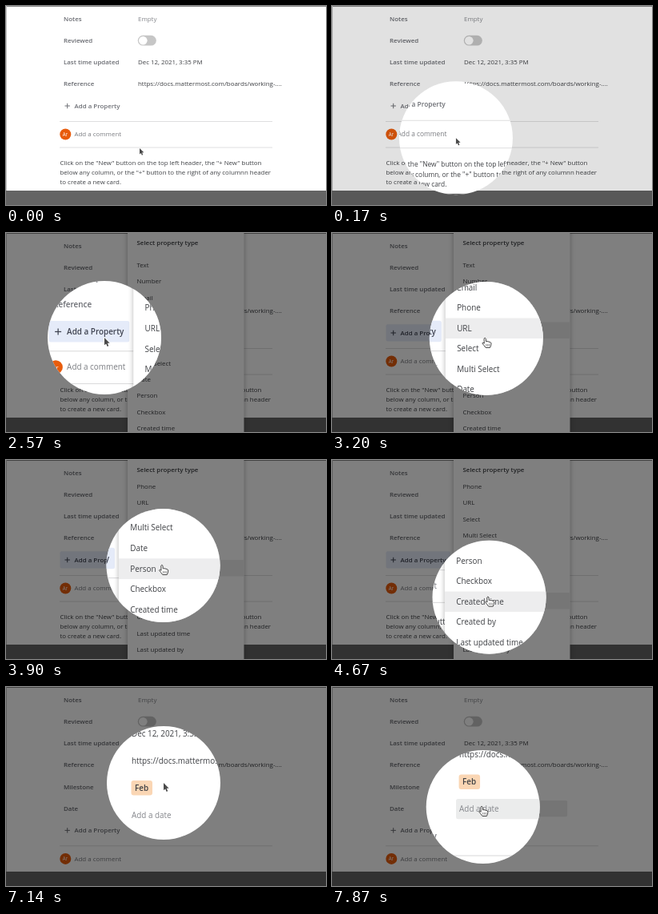
Write an HTML page with a canvas that moves like this. It is 400 px wide and 249 px high and loops after 8000 ms.

```html
<!DOCTYPE html>
<html lang="en">
<head>
<meta charset="utf-8">
<style>
  html, body { margin: 0; width: 100%; height: 100%; overflow: hidden; background: #fff; }
  canvas { display: block; width: 400px; height: 249px; }
</style>
</head>
<body>
<canvas id="stage" width="400" height="249"></canvas>
<script>
const ctx = document.getElementById('stage').getContext('2d');
const W = 400, H = 249, LOOP = 8000, RADIUS = 71, ZOOM = 1.25;
const ROW = 27.2, ITEM = 20.45, SCROLL = 68.3;
const MENU = { x: 152, w: 145.5, listTop: 22, first: 40 };
const TYPES = ['Text', 'Number', 'Email', 'Phone', 'URL', 'Select', 'Multi Select', 'Date', 'Person',
  'Checkbox', 'Created time', 'Created by', 'Last updated time', 'Last updated by'];

// Pointer path: time, x, y
const PATH = [
  [0, 167, 178], [30, 167, 178], [530, 134.5, 143.5], [830, 126, 135], [870, 126, 135],
  [1000, 123, 131], [2570, 123, 131], [3300, 196.5, 132], [3900, 196.5, 132],
  [4170, 196.5, 148], [4370, 196.5, 148], [4770, 196.5, 176], [5170, 196.5, 150],
  [5310, 196.5, 140], [5610, 197, 120], [7140, 197, 120], [7870, 188.7, 150], [LOOP, 188.7, 150]
];

const clamp = v => Math.max(0, Math.min(1, v));
const progress = (t, from, to) => clamp((t - from) / (to - from));
const smooth = p => p * p * (3 - 2 * p);

function pointerAt(t) {
  const i = Math.max(1, PATH.findIndex(k => k[0] > t));
  const [t0, x0, y0] = PATH[i - 1], [t1, x1, y1] = PATH[i];
  const raw = progress(t, t0, t1);
  const p = t0 === 30 ? 1 - (1 - raw) ** 1.4 : t1 - t0 > 350 ? smooth(raw) : raw;
  return { x: x0 + (x1 - x0) * p, y: y0 + (y1 - y0) * p };
}

function text(s, x, y, color = '#3f4145', weight = 400, size = 7.92) {
  ctx.font = `${weight} ${size}px "Open Sans", sans-serif`;
  ctx.fillStyle = color;
  ctx.fillText(s, x, y + size * 0.355);
}

function box(x, y, w, h, r, color) {
  ctx.fillStyle = color;
  ctx.beginPath();
  ctx.roundRect(x, y, w, h, r);
  ctx.fill();
}

function disc(x, y, r, color) {
  ctx.fillStyle = color;
  ctx.beginPath();
  ctx.arc(x, y, r, 0, Math.PI * 2);
  ctx.fill();
}

function property(name, row, value, color) {
  const y = 16 + row * ROW;
  text(name, 72, y, '#686a70', 600);
  if (value) text(value, 165, y, color);
}

function drawPage(t, pointer, extended) {
  ctx.fillStyle = '#fff';
  ctx.fillRect(0, 0, W, H);
  property('Notes', 0, 'Empty', '#85878c');
  property('Reviewed', 1);
  box(164.8, 36.8, 23, 12.8, 6.4, '#c6c6c6');
  disc(171.3, 43.2, 5.3, '#fff');
  property('Last time updated', 2, 'Dec 12, 2021, 3:35 PM');
  property('Reference', 3, 'https://docs.mattermost.com/boards/working-....');

  if (extended) {
    property('Milestone', 4);
    box(164.6, 117.6, 21.2, 14.8, 2.4, '#fad6b4');
    text('Feb', 168.2, 125, '#3f4145', 600);
    if (pointer.y > 142) box(161.8, 142, 132.4, 20.2, 2, '#ebecec');
    property('Date', 5, 'Add a date', '#85878c');
  }

  const dy = extended ? ROW * 2 : 0;
  const open = !extended && t >= 1600;
  if (open) box(67.5, 114.2, 80.5, 21.2, 2, '#e5ebf9');
  else if (!extended && t >= 870) box(67.5, 114.2, 80.5, 21.2, 2, '#eeeeef');
  const addColor = open ? '#3f4350' : '#6e7076';
  ctx.fillStyle = addColor;
  ctx.fillRect(73.5, 124.5 + dy, 6.4, 1);
  ctx.fillRect(76.2, 121.8 + dy, 1, 6.4);
  text('Add a Property', 85.5, 125 + dy, addColor, 600);

  ctx.fillStyle = '#dcdcdd';
  ctx.fillRect(67, 144 + dy, 266, 0.9);
  ctx.fillRect(67, 176.6 + dy, 266, 0.9);
  disc(74.3, 160.5 + dy, 7, '#e85c0c');
  text('Ar', 70.7, 160.5 + dy, '#fff', 400, 6.2);
  text('Add a comment', 85.5, 160.5 + dy, '#7b7d82');

  const about = ['Click on the "New" button on the top left header, the "+ New" button',
    'below any column, or the "+" button to the right of any columnn header',
    'to create a new card.'];
  about.forEach((line, i) => text(line, 67.5, 196.5 + dy + i * 11.6));

  ctx.fillStyle = '#646464';
  ctx.fillRect(0, 231, W, 18);
  ctx.fillStyle = '#8a8a8a';
  ctx.fillRect(0, 0, W, 1);
  ctx.fillStyle = '#c4c4c4';
  ctx.fillRect(0, 0, 1, 231);
}

function drawMenu(t, pointer) {
  ctx.save();
  ctx.globalAlpha *= progress(t, 1570, 1850);
  ctx.shadowColor = 'rgba(0,0,0,.3)';
  ctx.shadowBlur = 6;
  box(MENU.x, -10, MENU.w, H + 30, 2, '#fff');
  ctx.shadowColor = 'transparent';
  text('Select property type', 163.5, 12, '#3f4145', 600);
  ctx.beginPath();
  ctx.rect(MENU.x, MENU.listTop, MENU.w, H);
  ctx.clip();
  const scroll = SCROLL * smooth(progress(t, 3540, 3860));
  TYPES.forEach((name, i) => {
    const y = MENU.first + i * ITEM - scroll;
    const hovered = pointer.x > MENU.x && Math.abs(pointer.y - y) < ITEM / 2;
    if (hovered) box(MENU.x, y - ITEM / 2, MENU.w, ITEM, 0, '#ededee');
    text(name, 163.5, y);
  });
  ctx.restore();
}

function outline(points, x, y) {
  ctx.beginPath();
  points.forEach(([px, py]) => ctx.lineTo(x + px, y + py));
  ctx.closePath();
}

function drawPointer({ x, y }, hand) {
  ctx.lineJoin = 'round';
  if (hand) {
    outline([[-2.2, .2], [-1.3, -.6], [-.4, .2], [-.2, 3.1], [1, 2.9], [2.6, 3.3], [4.2, 3.8], [5, 4.8],
      [4.6, 7.2], [3.8, 9.2], [-.6, 9.2], [-2.4, 6.8], [-4, 4.8], [-3.2, 4], [-2, 5]], x, y);
    ctx.fillStyle = '#fff';
    ctx.strokeStyle = '#444';
    ctx.lineWidth = 0.8;
    ctx.fill();
    ctx.stroke();
    ctx.beginPath();
    for (const dx of [0, 1.5, 3]) {
      ctx.moveTo(x + dx, y + 5.6);
      ctx.lineTo(x + dx, y + 7.8);
    }
    ctx.lineWidth = 0.5;
    ctx.stroke();
  } else {
    outline([[0, 0], [0, 7.4], [1.7, 5.9], [2.9, 8.7], [4.2, 8.1], [3, 5.4], [5.3, 5.3]], x, y);
    ctx.strokeStyle = '#fff';
    ctx.lineWidth = 1.2;
    ctx.stroke();
    ctx.fillStyle = '#4a4a4a';
    ctx.fill();
  }
}

function drawScene(t, pointer) {
  const swap = progress(t, 5920, 6140);
  if (swap < 1) {
    drawPage(t, pointer, false);
    if (t >= 1570) drawMenu(t, pointer);
  }
  if (swap > 0) {
    ctx.save();
    ctx.globalAlpha = swap;
    drawPage(t, pointer, true);
    ctx.restore();
  }
  const overMenu = t < 5970 && pointer.x > MENU.x && t > 1600;
  drawPointer(pointer, overMenu || (t > 6140 && pointer.y > 142));
}

function render(t) {
  const pointer = pointerAt(t);
  const light = smooth(progress(t, 30, 480));
  drawScene(t, pointer);
  if (!light) return;

  ctx.fillStyle = `rgba(0,0,0,${0.5 * light})`;
  ctx.fillRect(0, 0, W, H);

  ctx.save();
  ctx.beginPath();
  ctx.arc(pointer.x, pointer.y, RADIUS, 0, Math.PI * 2);
  ctx.clip();
  const zoom = 1 + (ZOOM - 1) * light;
  ctx.translate(pointer.x, pointer.y);
  ctx.scale(zoom, zoom);
  ctx.translate(-pointer.x, -pointer.y);
  drawScene(t, pointer);
  ctx.restore();
}

const start = performance.now();
function frame() {
  render((performance.now() - start) % LOOP);
  requestAnimationFrame(frame);
}
frame();
</script>
</body>
</html>
```
